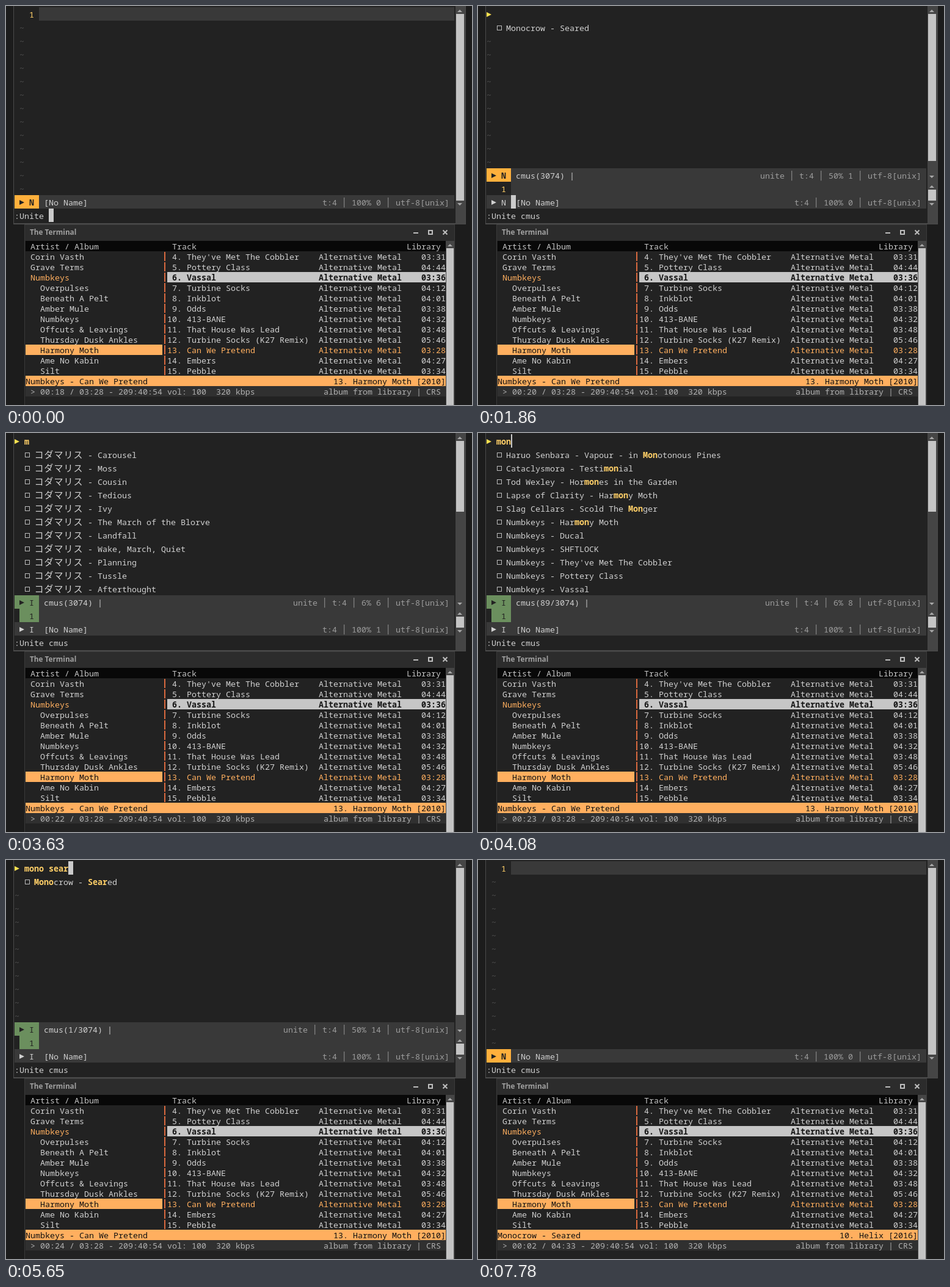
Recreate the animation shown at these times as an HTML page. Size 763 by 654 pixels, loop 8 s.

```html
<!DOCTYPE html>
<html lang="en">
<head>
<meta charset="utf-8">
<title>Editor and player</title>
<style>
html, body { margin: 0; width: 100%; height: 100%; overflow: hidden; background: #1c1c1c; }
svg { display: block; width: 763px; height: 654px; }
text { font: 13.3333px "Noto Sans Mono", "DejaVu Sans Mono", monospace; white-space: pre; }
text.b { font-weight: 700; }
text.kana { font: 15px "Noto Sans CJK JP", "Noto Sans CJK", sans-serif; }
text.title { font: 700 11.75px "Noto Sans", "Open Sans", sans-serif; }
</style>
</head>
<body>
<svg viewBox="0 0 763 654">
  <g id="base"></g>
  <g id="editor"></g>
  <g id="player"></g>
</svg>
<script>
(() => {
const LOOP = 8000, CELL = 8, LEFT = 14, LINE = 22, RIGHT = 734;
const BG = '#222222', BAR = '#393939', FG = '#d0d0d0', DIM = '#9c9c9c';
const ORANGE = '#ffaf5f', AMBER = '#ffb03c', GREEN = '#6b8f5e', GOLD = '#ffd068';
const THUMB = '#c4c4c4', TROUGH = '#454545', SELECT = '#c6c6c6';

const esc = s => s.replace(/&/g, '&amp;').replace(/</g, '&lt;').replace(/>/g, '&gt;');
const rect = (x, y, w, h, fill) => `<rect x="${x}" y="${y}" width="${w}" height="${h}" fill="${fill}"/>`;
const text = (x, y, s, fill = FG, cls = '') => `<text x="${x}" y="${y}" fill="${fill}" class="${cls}">${esc(s)}</text>`;
const endText = (x, y, s, fill) => text(x - s.length * CELL, y, s, fill);
const poly = (points, fill) => `<polygon points="${points}" fill="${fill}"/>`;
const play = (x, y, fill) => poly(`${x},${y - 4} ${x + 8},${y} ${x},${y + 4}`, fill);
const arrow = (x, y, dir) => poly(`${x - 4},${y + 2 * dir} ${x + 4},${y + 2 * dir} ${x},${y - 2 * dir}`, '#a8a8a8');

// ---------- editor ----------
const lineTop = row => 2 + row * LINE;
const lineBase = row => lineTop(row) + 17;
const col = n => LEFT + n * CELL;

const OMNI = 'コダマリス';
const BAND = 'Numbkeys';
const HIT = 'Monocrow', SONG = 'Seared';
const lists = {
  old: [`${HIT} - ${SONG}`],
  all: ['Carousel', 'Moss', 'Cousin', 'Tedious', 'Ivy', 'The March of the Blorve', 'Landfall',
    'Wake, March, Quiet', 'Planning', 'Tussle', 'Afterthought'].map(s => `${OMNI} - ${s}`),
  mon: ['Haruo Senbara - Vapour - in *Mon*otonous Pines', 'Cataclysmora - Testi*mon*ial',
    'Tod Wexley - Hor*mon*es in the Garden', 'Lapse of Clarity - Har*mon*y Moth',
    'Slag Cellars - Scold The *Mon*ger', `${BAND} - Har*mon*y Moth`,
    ...['Ducal', 'SHFTLOCK', "They've Met The Cobbler", 'Pottery Class', 'Vassal'].map(s => `${BAND} - ${s}`)],
};
const counts = { old: '3074', all: '3074', mon: '89/3074', one: '1/3074' };

// Asterisks enclose the matched, bold part of an entry.
function entry(s, row) {
  let x = col(4), out = `<rect x="31.5" y="${lineTop(row) + 8.5}" width="7" height="7" fill="none" stroke="#bdbdbd"/>`;
  if (s.startsWith(OMNI)) {
    const xs = [...OMNI].map((_, i) => x + 0.5 + i * 16).join(' ');
    out += text(xs, lineBase(row), OMNI, FG, 'kana');
    x += OMNI.length * 16;
    s = s.slice(OMNI.length);
  }
  s.split('*').forEach((part, i) => {
    if (part) out += text(x, lineBase(row), part, i % 2 ? GOLD : FG, i % 2 ? 'b' : '');
    x += part.length * CELL;
  });
  return out;
}

function matches(view, query) {
  if (view !== 'one') return lists[view];
  const n = query.split(' ')[1].length;
  return [`*${HIT.slice(0, 4)}*${HIT.slice(4)} - *${SONG.slice(0, n)}*${SONG.slice(n)}`];
}

function statusLine(row, mode, label, info, active) {
  const fill = mode === 'N' ? AMBER : GREEN, ink = active ? '#222' : FG;
  return rect(LEFT, lineTop(row), RIGHT - LEFT, LINE, BAR) +
    (active ? rect(LEFT, lineTop(row), 40, LINE, fill) : '') +
    play(col(1), lineTop(row) + 12, ink) +
    text(col(3), lineBase(row), mode, ink, active && mode === 'N' ? 'b' : '') +
    text(col(6), lineBase(row), label) +
    endText(726, lineBase(row), info + ' │ utf-8[unix]', DIM);
}

const tildes = (x, from, to) => {
  let out = '';
  for (let r = from; r <= to; r++) out += text(x, lineBase(r), '~', '#515151');
  return out;
};

const scrollBar = (y1, y2, from, to) =>
  arrow(743, y1, 1) + rect(737, from, 13, to - from, THUMB) + arrow(743, y2, -1);

function fileView() {
  return rect(col(5), lineTop(0), RIGHT - col(5), LINE, BAR) +
    text(col(3), lineBase(0), '1', GOLD) + tildes(col(1), 1, 13) +
    statusLine(14, 'N', '[No Name]', 't:4 │ 100% 0', true) + scrollBar(8, 325, 13, 319);
}

function listView({ view, query, mode }) {
  const items = matches(view, query), short = items.length === 1, insert = mode === 'I';
  const place = `${short ? 50 : 6}% ${insert ? query.length + 5 : 1}`;
  return play(LEFT, 14, '#ffe050') + text(col(2), lineBase(0), query, GOLD, 'b') +
    items.map((s, i) => entry(s, i + 1)).join('') +
    tildes(LEFT, items.length + 1, 11) +
    statusLine(12, mode, `cmus(${counts[view]}) |`, `unite │ t:4 │ ${place}`, true) +
    rect(col(5), lineTop(13), RIGHT - col(5), LINE, BAR) +
    (insert ? rect(col(1), lineTop(13), 32, LINE, GREEN) : '') +
    text(col(3), lineBase(13), '1', insert ? BG : GOLD) +
    statusLine(14, mode, '[No Name]', `t:4 │ 100% ${insert ? 1 : 0}`, false) +
    scrollBar(8, 280, 13, short ? 254 : 129) + scrollBar(296, 325, 301, 319);
}

function cursor(cur) {
  if (!cur) return '';
  const [c, row, w = CELL, under = ''] = cur;
  return rect(col(c), lineTop(row), w, LINE, '#cbcbcb') + (under && text(col(c), lineBase(row), under, BG));
}

const drawEditor = s => (s.view === 'file' ? fileView() : listView(s)) +
  text(LEFT, lineBase(15), ':Unite ' + s.cmd) + cursor(s.cur);

// ---------- player ----------
const rowTop = r => 402 + r * 17;
const rowBase = r => rowTop(r) + 14;
const albums = ['Corin Vasth', 'Grave Terms', BAND, '  Overpulses', '  Beneath A Pelt', '  Amber Mule', `  ${BAND}`,
  '  Offcuts & Leavings', '  Thursday Dusk Ankles', '  Harmony Moth', '  Ame No Kabin', '  Silt'];
const tracks = ["They've Met The Cobbler 03:31", 'Pottery Class 04:44', 'Vassal 03:36', 'Turbine Socks 04:12',
  'Inkblot 04:01', 'Odds 03:38', '413-BANE 04:32', 'That House Was Lead 03:48', 'Turbine Socks (K27 Remix) 05:46',
  'Can We Pretend 03:28', 'Embers 04:27', 'Pebble 03:34'];
const songs = [
  { title: `${BAND} - Can We Pretend`, album: '13. Harmony Moth [2010]', length: '03:28' },
  { title: `${HIT} - ${SONG}`, album: '10. Helix [2016]', length: '04:33' },
];

function drawBase() {
  let out = rect(12, 0, 741, 358, '#4b4b4b') + rect(13, 0, 723, 356, BG) + rect(736, 0, 16, 357, TROUGH);
  out += rect(30, 358, 705, 296, '#3a3a3a') + rect(31, 359, 703, 26, '#2c2c2c') + rect(31, 385, 689, 269, BG);
  out += text(39, 375, 'The Terminal', '#a0a0a0', 'title');
  out += rect(667, 371, 8, 2, '#bdbdbd') +
    '<g fill="none" stroke="#bdbdbd" stroke-width="2"><rect x="692" y="368" width="6" height="6"/><path d="M715.5 367.5l7 7m0-7l-7 7"/></g>';
  out += rect(720, 385, 14, 269, TROUGH) + arrow(727, 392, 1) + rect(721, 397, 12, 257, THUMB);
  out += rect(32, 385, 688, 17, '#080808') + text(40, 399, 'Artist / Album', '#c4c4c4') +
    text(272, 399, 'Track', '#c4c4c4') + endText(712, 399, 'Library', '#c4c4c4');
  albums.forEach((s, r) => {
    if (r === 9) out += rect(32, rowTop(r), 224, 17, ORANGE);
    const label = s.trimStart();
    out += text(40 + (s.length - label.length) * CELL, rowBase(r), label, r === 9 ? '#111' : r === 2 ? ORANGE : FG);
    out += rect(259, rowTop(r) + 1, 2, 15, '#d9693f');
  });
  tracks.forEach((s, r) => {
    const chosen = r === 2, y = rowBase(r), n = `${r + 4}.`;
    const fill = chosen ? '#161616' : r === 9 ? ORANGE : FG, cls = chosen ? 'b' : '';
    if (chosen) out += rect(264, rowTop(r), 456, 17, SELECT);
    out += text(288 - n.length * CELL, y, n, fill, cls) + text(296, y, s.slice(0, -6), fill, cls) +
      text(512, y, 'Alternative Metal', fill, cls) + text(680, y, s.slice(-5), fill, cls);
  });
  return out;
}

function drawPlayer({ song, sec }) {
  const { title, album, length } = songs[song];
  return rect(32, 606, 688, 17, ORANGE) + text(32, 620, title, '#111') + endText(720, 620, album, '#111') +
    rect(32, 623, 688, 17, '#303030') +
    text(40, 637, `> 00:${String(sec).padStart(2, '0')} / ${length} - 209:40:54 vol: 100  320 kbps`, '#b0b0b0') +
    endText(712, 637, 'album from library | CRS', '#b0b0b0');
}

// ---------- timeline ----------
const bar = n => [n + 2, 0, 2];
const block = [5, 0];
const steps = [
  [0, { view: 'file', mode: 'N', query: '', cmd: '', cur: [7, 15], song: 0, sec: 18 }],
  [50, { cmd: 'c', cur: [8, 15] }],
  [100, { sec: 19 }],
  [160, { cmd: 'cm', cur: [9, 15] }],
  [380, { cmd: 'cmu', cur: [10, 15] }],
  [460, { cmd: 'cmus', cur: [11, 15] }],
  [870, { cur: [0, 15, CELL, ':'] }],
  [960, { sec: 20 }],
  [1800, { view: 'old', cur: null }],
  [1860, { cur: [5, 14] }],
  [2010, { cur: null }],
  [2100, { sec: 21 }],
  [2450, { view: 'all', mode: 'I' }],
  [2500, { cur: bar(0) }],
  [2940, { sec: 22 }],
  [3270, { cur: null }],
  [3380, { cur: bar(0) }],
  [3630, { query: 'm', cur: null }],
  [3680, { cur: bar(1) }],
  [3760, { query: 'mo', cur: null }],
  [3820, { cur: bar(2) }],
  [3880, { sec: 23 }],
  [3950, { query: 'mon', cur: null }],
  [4010, { view: 'mon' }],
  [4080, { cur: bar(3) }],
  [4140, { query: 'mono', cur: null }],
  [4280, { cur: bar(4) }],
  [4540, { query: 'mono ', cur: bar(5) }],
  [4610, { query: 'mono s', cur: bar(6) }],
  [4690, { view: 'one', query: 'mono se', cur: bar(7) }],
  [4830, { query: 'mono sea', cur: bar(8) }],
  [5100, { query: 'mono sear', cur: bar(9), sec: 24 }],
  [5580, { cur: null }],
  [5650, { cur: [11, 0] }],
  [5720, { view: 'file', mode: 'N', cur: null }],
  [5770, { song: 1, sec: 0, cur: block }],
  [6490, { cur: null }],
  [6740, { cur: block }],
  [6820, { sec: 1 }],
  [7120, { cur: null }],
  [7330, { cur: block }],
  [7720, { cur: null }],
  [7780, { sec: 2 }],
];
let merged = {};
const states = steps.map(([at, change]) => ({ at, ...(merged = { ...merged, ...change }) }));

const layer = id => document.getElementById(id);
layer('base').innerHTML = drawBase();
const start = performance.now();
let shown = null;

function tick() {
  const t = (performance.now() - start) % LOOP;
  const state = states.filter(s => s.at <= t).pop();
  if (state !== shown) {
    layer('editor').innerHTML = drawEditor(state);
    layer('player').innerHTML = drawPlayer(state);
    shown = state;
  }
  requestAnimationFrame(tick);
}
tick();
})();
</script>
</body>
</html>
```
